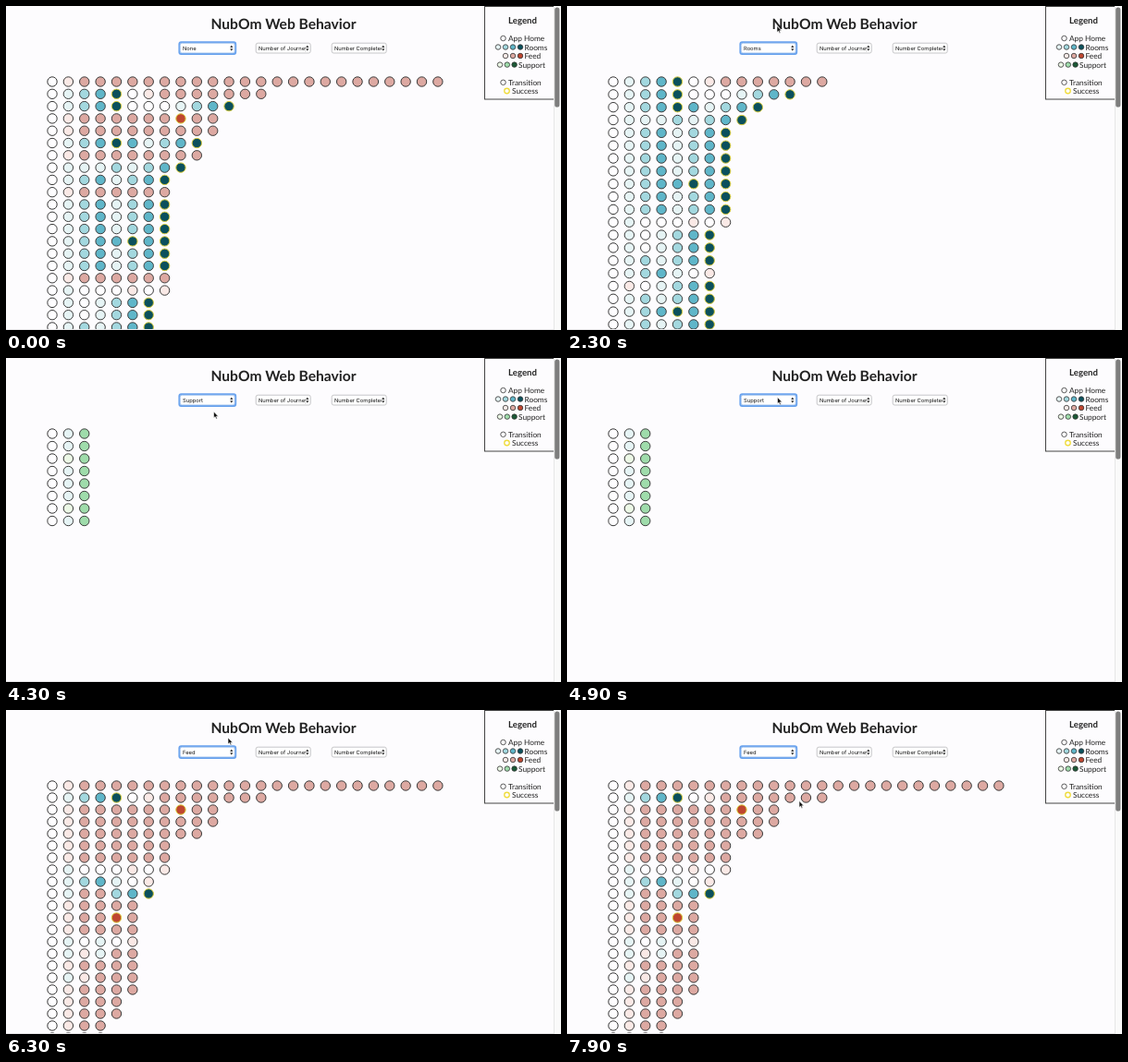
Recreate the animation shown at these times as an HTML page with a canvas. Size 600 by 351 pixels, loop 8000 ms.

```html
<!DOCTYPE html>
<html lang="en">
<head>
<meta charset="utf-8">
<title>Web Behavior</title>
<style>
  html, body { margin: 0; width: 100%; height: 100%; overflow: hidden; background: #fdfcfe; }
  canvas, svg { position: absolute; left: 0; top: 0; width: 600px; height: 351px; }
  text { font-family: Lato, "Open Sans", sans-serif; fill: #222; text-rendering: geometricPrecision; }
  .title { font-size: 15.6px; font-weight: 700; text-anchor: middle; }
  .head { font-size: 9.6px; font-weight: 700; text-anchor: middle; }
  .key { font-size: 8.3px; }
  .opt { font: 5.8px Inter, "Liberation Sans", sans-serif; fill: #111; }
  .tip { font-size: 6.3px; fill: #111; }
</style>
</head>
<body>
<canvas id="chart"></canvas>
<svg id="ui" viewBox="0 0 600 351">
  <defs>
    <filter id="shade" x="-20%" y="-60%" width="140%" height="240%">
      <feDropShadow dx="0" dy="1" stdDeviation="2.6" flood-color="#000" flood-opacity=".42"/>
    </filter>
  </defs>
  <text class="title" x="300" y="25.3">NubOm Web Behavior</text>
  <g id="selects"></g>
  <g id="legend">
    <rect x="517.5" y=".5" width="75" height="100.5" fill="#fdfcfe" stroke="#444"/>
    <text class="head" x="558.5" y="19">Legend</text>
  </g>
  <path d="M0 350.5H592" stroke="#e9e8ea"/>
  <rect x="592" width="8" height="351" fill="#fafafa"/>
  <path d="M592.5 0V351" stroke="#e6e6e6"/>
  <rect x="593.2" y="1.5" width="5.2" height="108" rx="2.6" fill="#7d7d7d"/>
  <g id="tip">
    <rect x="253" y="58" width="123" height="25" rx="1" fill="#f6f5f6" filter="url(#shade)"/>
    <text class="tip" x="258" y="69.6">user: 3e1ffa527f0cf1bdc8f4ff1d60acfeef</text>
    <text class="tip" x="258" y="79.2">action: feed_scroll</text>
  </g>
  <path id="cursor" d="M0 0V7L1.6 5.6 2.7 8.1 3.9 7.6 2.8 5.2H5Z" fill="#111" stroke="#fff" stroke-width=".6"/>
</svg>
<script>
const LOOP = 8000, W = 600, H = 351;
const $ = id => document.getElementById(id);

// w home, a-D rooms, p-R feed, x-Z support; capitals mark a success
const FILL = {
  w: '#fefdff', a: '#e6f4f5', b: '#a3d8df', c: '#5fb6c9', D: '#0b505c',
  p: '#fae9e6', q: '#dda9a2', R: '#bf4630',
  x: '#ecf8e6', y: '#9fdcab', Z: '#1b5a37'
};
const feed = n => 'wp' + 'q'.repeat(n - 2);
const times = (n, row) => Array(n).fill(row);

const mixed = 'wabcDwpqqqqqqq', long = 'wabcDwwwabcD', twice = 'wabcDcabcD',
      slow = 'waaababcD', room = 'wabcabcD', retry = 'wabccDcD',
      drift = 'wawwwpwp', hit = 'wpqqqqqqRqq', brief = 'wawabcD', back = 'wabcawp';
const rooms8 = [room, ...times(3, room), retry, room, room];

const VIEWS = [
  { start: 0, name: 'None', gap: 13.3, rows: [
    feed(25), mixed, long, hit, feed(11), twice, feed(10), slow, room, feed(8),
    ...rooms8.slice(1), feed(8), drift, brief, brief, 'wababcD'] },
  { start: 2300, name: 'Rooms', gap: 13.84, rows: [
    mixed, long, twice, slow, ...rooms8, drift, brief, brief, 'wababcD', back,
    'wpwabcD', 'wababcD', 'wabcDcD', 'wababcD'] },
  { start: 4300, name: 'Support', gap: 13.5, rows:
    ['way', 'way', 'wxy', 'way', 'way', 'way', 'wxy', 'way'] },
  { start: 6000, name: 'Feed', gap: 13, rows: [
    feed(25), mixed, hit, feed(11), feed(10), feed(8), feed(8), drift, back, 'waqqbcD',
    feed(6), 'wpqqRq', feed(6), 'wawawp', 'wapaqq', feed(6), 'wapqqq', feed(6),
    feed(5), feed(5), feed(4), feed(4)] }
];

// pointer way-points: time, x, y
const PATH = [
  [300, 300, -8], [500, 288, 4], [900, 241, 42], [2200, 241, 42],
  [2300, 227, 21.5], [2400, 227, 21.5], [2800, 235, 39], [3000, 235, 39],
  [3200, 237, 42], [4200, 237, 42], [4300, 224.5, 58], [5000, 228, 40],
  [5800, 228, 40], [5900, 228.5, 37], [6100, 233, 14], [6300, 240, 30],
  [6700, 260, 76], [7200, 261.5, 80], [7500, 260, 85], [7900, 251, 98.5], [8000, 251, 98.5]
];

const NS = 'http://www.w3.org/2000/svg';
function add(parent, tag, attrs, text) {
  const el = document.createElementNS(NS, tag);
  for (const k in attrs) el.setAttribute(k, attrs[k]);
  if (text) el.textContent = text;
  parent.appendChild(el);
  return el;
}

function addSelect(x, label, focused) {
  const g = $('selects');
  if (focused) add(g, 'rect', { x: x - .6, y: 39.2, width: 60.8, height: 12.8, rx: 2, fill: 'none', stroke: '#6aa3ee', 'stroke-width': 2 });
  add(g, 'rect', { x: x + .2, y: 40.2, width: 59, height: 10.8, rx: 2, fill: '#fff', stroke: focused ? '#8fb6ea' : '#b9b9bb', 'stroke-width': .8 });
  const clip = add(g, 'svg', { x: x + 3, y: 40, width: 51, height: 12 });
  const text = add(clip, 'text', { class: 'opt', x: 0, y: 7.6 }, label);
  const ax = x + 55.8;
  add(g, 'path', { d: `M${ax - 1.6} 45L${ax} 42.5 ${ax + 1.6} 45ZM${ax - 1.6} 46.2L${ax} 48.7 ${ax + 1.6} 46.2Z`, fill: '#333' });
  return text;
}

function addKey(y, dots, label, x, step, textX, ring = '#333') {
  [...dots].forEach((k, i) => add($('legend'), 'circle', {
    cx: x + i * step, cy: y, r: 2.75, fill: FILL[k], stroke: ring, 'stroke-width': ring === '#333' ? .8 : 1.3
  }));
  add($('legend'), 'text', { class: 'key', x: textX, y: y + 3 }, label);
}

const picked = addSelect(188, 'None', true);
addSelect(270, 'Number of Journeys');
addSelect(352, 'Number Completed');
addKey(35, 'w', 'App Home', 537.5, 0, 543);
addKey(44.5, 'abcD', 'Rooms', 532, 8, 560.5);
addKey(54, 'pqR', 'Feed', 540, 8, 560.5);
addKey(63.6, 'xyZ', 'Support', 534, 7.8, 554);
addKey(82.8, 'w', 'Transition', 537.5, 0, 543);
addKey(92, 'w', 'Success', 541.5, 0, 547, '#efdc3a');

const canvas = $('chart'), ctx = canvas.getContext('2d');
const ratio = window.devicePixelRatio || 1;
canvas.width = W * ratio;
canvas.height = H * ratio;
ctx.scale(ratio, ratio);

function drawDot(kind, x, y) {
  ctx.beginPath();
  ctx.arc(x, y, 5.2, 0, Math.PI * 2);
  ctx.fillStyle = FILL[kind];
  ctx.fill();
  ctx.lineWidth = 1;
  ctx.strokeStyle = kind < 'a' ? '#d8cb3c' : '#3a3a3a';
  ctx.stroke();
}

function drawView(view) {
  ctx.fillStyle = '#fdfcfe';
  ctx.fillRect(0, 0, W, H);
  view.rows.forEach((row, r) => [...row].forEach((kind, c) =>
    drawDot(kind, 50 + c * 17.37, 82 + r * view.gap)));
  picked.textContent = view.name;
}

function pointer(t) {
  const i = PATH.findIndex(p => p[0] > t);
  if (i < 1) return null;
  const [t0, x0, y0] = PATH[i - 1], [t1, x1, y1] = PATH[i];
  const k = (t - t0) / (t1 - t0);
  return [x0 + (x1 - x0) * k, y0 + (y1 - y0) * k];
}

const clamp = v => Math.max(0, Math.min(1, v));
let shown = null;

function frame(now) {
  const t = Math.floor(now % LOOP / 100) * 100;
  const view = VIEWS.filter(v => v.start <= t).pop();
  if (view !== shown) drawView(shown = view);
  const at = pointer(t);
  $('cursor').style.display = at ? '' : 'none';
  if (at) $('cursor').setAttribute('transform', `translate(${at[0]} ${at[1]})`);
  $('tip').setAttribute('opacity', Math.min(clamp((t - 6700) / 200), clamp((7900 - t) / 300)));
  requestAnimationFrame(frame);
}
requestAnimationFrame(frame);
</script>
</body>
</html>
```
